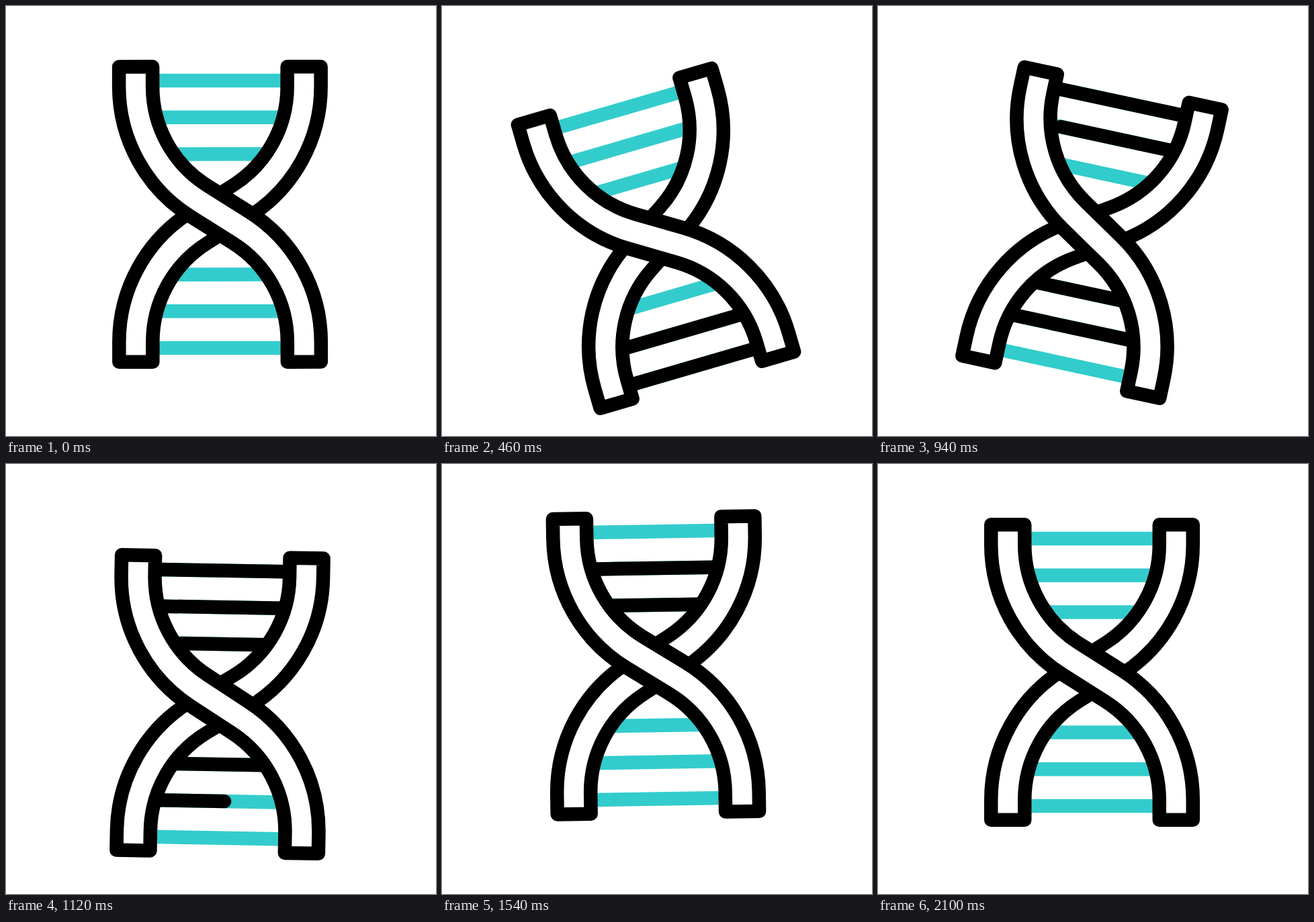
Write an HTML page that moves like this. It is 640x640 px and loops after 2400 ms.

```html
<!DOCTYPE html>
<html lang="en">
<head>
<meta charset="utf-8">
<title>DNA helix</title>
<style>
  html, body { margin: 0; width: 100%; height: 100%; overflow: hidden; background: #fff; }
  svg { display: block; width: 100vw; height: 100vh; }
  path { fill: none; stroke: #000; stroke-width: 20.5; }
  .rung { stroke: #33cccc; }
  .ink { stroke-linecap: round; }
  #strand { fill: #fff; stroke-linejoin: round; }
</style>
</head>
<body>
<svg viewBox="0 0 640 640">
  <g id="helix">
    <g id="rungs"></g>
    <use href="#strand" transform="scale(-1 1)"/>
    <path id="strand" d="
      M-100.25-219.7V-190A174 174 0 0 0-19-42.8L43.4-3.5A228.7 228.7 0 0 1 150.25 190V219.7
      H100.25V190A174 174 0 0 0 19 42.8L-43.4 3.5A228.7 228.7 0 0 1-150.25-190V-219.7Z"/>
  </g>
</svg>
<script>
const LOOP = 2400, REST = 2100;
const DRAW = 178, ERASE = 145;

const helix = document.getElementById("helix");
const group = document.getElementById("rungs");

const clamp = u => Math.min(1, Math.max(0, u));
const smooth = u => u * u * (3 - 2 * u);
const soft = u => 0.7 * u + 0.3 * smooth(u);

// eased path through evenly spaced peaks, the last one reached at REST
function sway(peaks, step, ease) {
  return t => {
    const i = Math.min(Math.floor(t / step), peaks.length - 2);
    const from = i * step, to = Math.min(from + step, REST);
    const u = t >= REST ? 1 : (t - from) / (to - from);
    return peaks[i] + (peaks[i + 1] - peaks[i]) * ease(u);
  };
}

const swing = sway([0, -18.1, 16, -8.1, 4, 0], 430, soft);
const bounce = sway([0, 55.4, -36.5, 52.4, -20, 15, 0], 355, smooth);

function addPath(className, d) {
  const path = document.createElementNS("http://www.w3.org/2000/svg", "path");
  path.setAttribute("class", className);
  path.setAttribute("d", d);
  group.append(path);
  return path;
}

// three rungs from each end towards the crossing
function addRungs(side, drawAt, eraseAt) {
  return [0, 1, 2].map(k => {
    const y = side * (199 - 54.7 * k);
    const half = 95 - 6.5 * k * k;
    addPath("rung", `M${-half} ${y}H${half}`);
    return {
      y, half,
      ink: addPath("ink", ""),
      drawAt: drawAt + 183 * k,
      eraseAt: eraseAt + 287 * k ** 0.65
    };
  });
}

const rungs = [...addRungs(1, 97, 769), ...addRungs(-1, 590, 1327)];

function render(t) {
  helix.setAttribute("transform", `translate(318.5 ${310 + bounce(t)}) rotate(${swing(t)})`);

  // each black bar enters at the right and is wiped away from the right
  for (const { y, half, ink, drawAt, eraseAt } of rungs) {
    const head = clamp((t - drawAt) / DRAW);
    const tail = clamp((t - eraseAt) / ERASE);
    const x = u => half * (1 - 2 * u);
    ink.setAttribute("d", head > tail ? `M${x(tail)} ${y}H${x(head)}` : "");
  }
}

const start = performance.now();
function tick() {
  render((performance.now() - start) % LOOP);
  requestAnimationFrame(tick);
}
tick();
</script>
</body>
</html>
```
